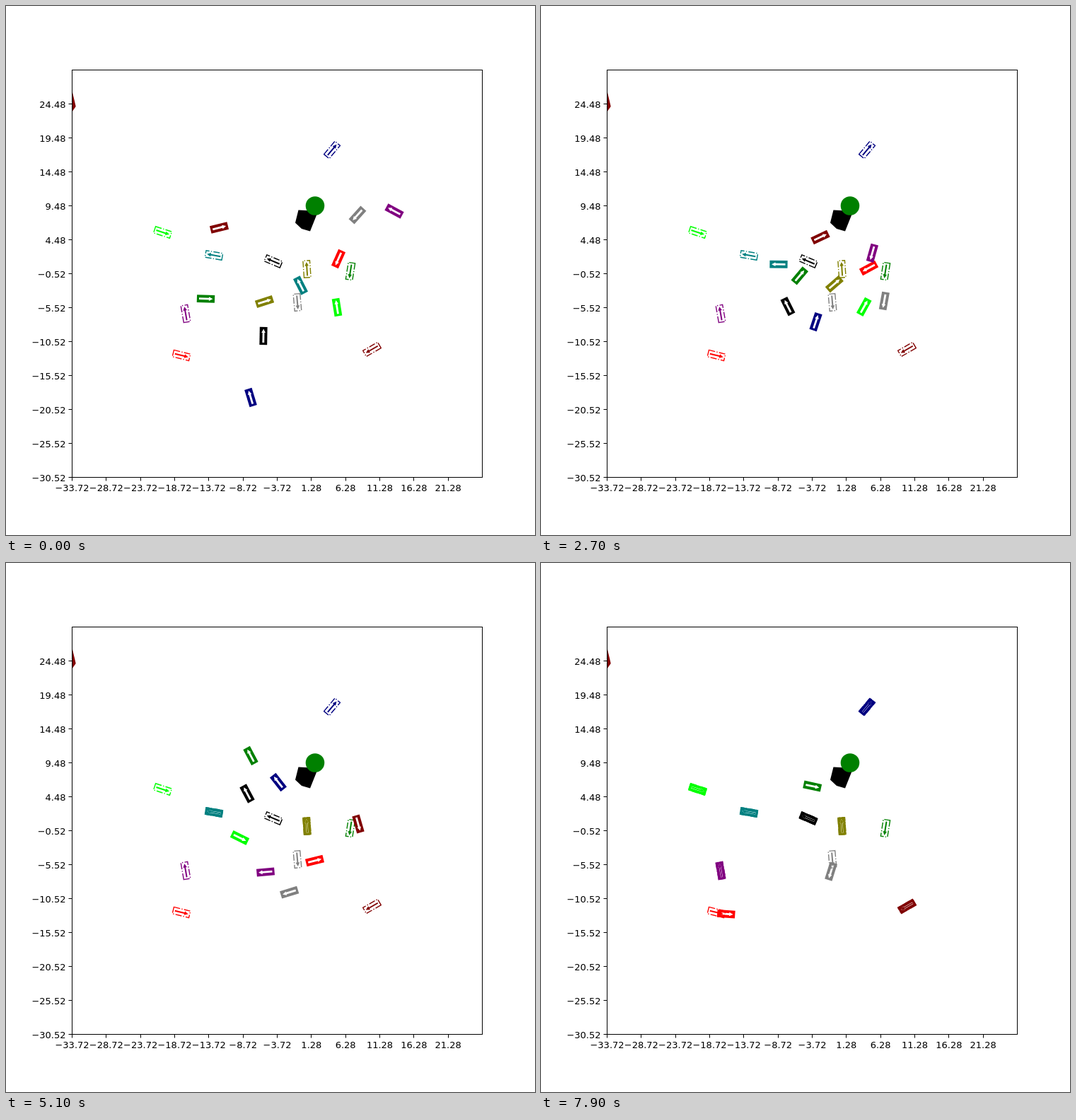
An HTML page with a canvas for the animation above (8 s loop, 748 by 748 pixels).

```html
<!DOCTYPE html>
<html>
<head>
<meta charset="utf-8">
<style>
  html, body { margin: 0; width: 100%; height: 100%; overflow: hidden; background: #fff; }
  canvas { display: block; width: 748px; height: 748px; }
</style>
</head>
<body>
<canvas id="stage" width="748" height="748"></canvas>
<script>
const ctx = document.getElementById('stage').getContext('2d');
const LOOP = 8000, STEP = 100;
const LENGTH = 24, WIDTH = 9.6;
const AXES = { left: 93.5, top: 90.5, width: 580, height: 576, ticks: 12 };

function hermite(p, m, q, n, u) {
  const c = 3 * (q - p) - 2 * m - n, d = 2 * (p - q) + m + n;
  return { value: p + u * (m + u * (c + u * d)), slope: m + u * (2 * c + 3 * u * d) };
}

const poseOf = (x, y, degrees) => ({ x, y, a: degrees * Math.PI / 180 });

// Starts at rest and leaves and meets every pose along its heading, forwards or in reverse.
class Car {
  constructor(color, x, y, degrees) {
    this.color = color;
    this.last = { step: 0, ...poseOf(x, y, degrees) };
    this.legs = [];
  }

  driveTo(step, x, y, degrees) {
    const from = this.last, to = { step, ...poseOf(x, y, degrees) };
    const turn = to.a - from.a;
    to.a = from.a + Math.atan2(Math.sin(turn), Math.cos(turn));
    const half = (to.a - from.a) / 2, mid = from.a + half;
    const dx = to.x - from.x, dy = to.y - from.y;
    const reach = Math.hypot(dx, dy) / Math.cos(half / 2) ** 2;
    const sign = dx * Math.cos(mid) + dy * Math.sin(mid) < 0 ? -1 : 1;
    const steps = to.step - from.step;
    this.legs.push({ from, to, steps, reach, sign, speed: reach / steps });
    this.last = to;
    return this;
  }

  parkAt(step, x, y, degrees) {
    this.goal = poseOf(x, y, degrees);
    return this.driveTo(step, x, y, degrees);
  }

  // Zero at both ends of the trip and wherever the car changes direction.
  speedBetween(before, after) {
    if (!before || !after || before.sign !== after.sign) return 0;
    return (before.speed * after.steps + after.speed * before.steps) / (before.steps + after.steps);
  }

  poseAt(step) {
    if (step >= this.last.step) return this.last;
    const i = this.legs.findIndex(leg => step < leg.to.step);
    const { from, to, steps, reach, sign } = this.legs[i];
    const s = (step - from.step) / steps;
    const pace = j => Math.min(2.6, this.speedBetween(this.legs[j - 1], this.legs[j]) * steps / reach);
    const u = hermite(0, pace(i), 1, pace(i + 1), s).value;
    const pull = sign * reach;
    const x = hermite(from.x, pull * Math.cos(from.a), to.x, pull * Math.cos(to.a), u);
    const y = hermite(from.y, pull * Math.sin(from.a), to.y, pull * Math.sin(to.a), u);
    const a = reach < 25 ? from.a + (to.a - from.a) * s : Math.atan2(sign * y.slope, sign * x.slope);
    return { x: x.value, y: y.value, a };
  }

  draw(step) {
    withPose(this.poseAt(step), () => {
      ctx.fillStyle = this.color;
      ctx.fillRect(-LENGTH / 2 - 0.6, -WIDTH / 2 - 0.6, LENGTH + 1.2, WIDTH + 1.2);
      drawArrow('#fff', 2.8);
    });
    withPose(this.goal, () => {
      ctx.strokeStyle = this.color;
      ctx.lineWidth = 1.4;
      ctx.setLineDash([8.9, 2.2, 1.4, 2.2]);
      ctx.strokeRect(-LENGTH / 2, WIDTH / 2, LENGTH, -WIDTH);
      drawArrow(this.color, 2);
    });
  }
}

function withPose({ x, y, a }, draw) {
  ctx.save();
  ctx.translate(x, y);
  ctx.rotate(a);
  draw();
  ctx.restore();
}

function fillPolygon(color, ...points) {
  ctx.fillStyle = color;
  ctx.beginPath();
  points.forEach(([x, y]) => ctx.lineTo(x, y));
  ctx.fill();
}

function drawArrow(color, width) {
  ctx.fillStyle = color;
  ctx.fillRect(-9.5, -width / 2, 15, width);
  fillPolygon(color, [4.5, -2.8], [10, 0], [4.5, 2.8]);
}

function drawObstacles() {
  fillPolygon('#000', [413.5, 288.5], [439, 290], [439, 296], [430, 318.5], [418, 315], [409, 306.5]);
  fillPolygon('maroon', [93.5, 120], [98.7, 142], [93.5, 149.5]);
  ctx.fillStyle = 'green';
  ctx.beginPath();
  ctx.arc(437, 282.5, 13.3, 0, 2 * Math.PI);
  ctx.fill();
}

function drawAxes() {
  const { left, top, width, height, ticks } = AXES;
  const bottom = top + height;
  const label = v => v.toFixed(2).replace('-', '\u2212');
  ctx.strokeStyle = ctx.fillStyle = '#000';
  ctx.lineWidth = 1;
  ctx.font = '13px "DejaVu Sans", sans-serif';
  ctx.strokeRect(left, top, width, height);
  ctx.beginPath();
  for (let i = 0; i < ticks; i++) {
    const x = left + i * width / ticks, y = bottom - i * height / ticks;
    const snapped = Math.floor(x) + 0.5;
    ctx.moveTo(snapped, bottom);
    ctx.lineTo(snapped, bottom + 5);
    ctx.moveTo(left, y);
    ctx.lineTo(left - 5, y);
    ctx.textAlign = 'center';
    ctx.fillText(label(-33.72 + 5 * i), x, 686);
    ctx.textAlign = 'right';
    ctx.fillText(label(-30.52 + 5 * i), left - 9, y + 5);
  }
  ctx.stroke();
}

const cars = [
  new Car('black', 364, 466.5, -89)
    .driveTo(33, 341, 402, -98).driveTo(50, 341, 326, -118).parkAt(78, 378, 361, 203),
  new Car('green', 282.5, 414, 2)
    .driveTo(33, 381, 351, -77).driveTo(50, 346, 272.5, -118).driveTo(62, 301, 260.5, 104)
    .parkAt(105, 487, 375, 99),
  new Car('red', 470, 357.5, 114)
    .driveTo(18, 454, 375.5, 155).driveTo(33, 485.5, 366.5, 205).driveTo(50, 436.5, 421, -14)
    .parkAt(85, 248, 494, 14),
  new Car('maroon', 301.5, 313.5, -14)
    .driveTo(18, 356, 336.5, 2).driveTo(33, 431.5, 307, -28).driveTo(50, 498, 369, 74)
    .parkAt(78, 517.5, 485.5, 150),
  new Car('gray', 497, 295.5, 132)
    .driveTo(33, 470, 445.5, 140).driveTo(62, 380, 477, 137).parkAt(86, 412, 419, 85),
  new Car('purple', 549, 290, 208)
    .driveTo(33, 461, 399.5, 91).driveTo(50, 367, 437, 175).parkAt(76, 254, 435, 260),
  new Car('lime', 468, 426, 261)
    .driveTo(18, 460, 404.5, 259).driveTo(33, 428, 440.5, 6).driveTo(50, 330.5, 388.5, 26)
    .driveTo(62, 266, 384.5, 36).parkAt(78, 221.5, 320, 18),
  new Car('teal', 416.5, 395, 243)
    .driveTo(18, 378.5, 358.5, 165).driveTo(33, 305.5, 357.5, 210).parkAt(50, 294, 352.5, 190),
  new Car('olive', 365.5, 418, -18)
    .driveTo(18, 400.5, 403, -31).parkAt(44, 425.5, 372, -94),
  new Car('navy', 346, 553.5, -107)
    .driveTo(33, 382.5, 413, -136).driveTo(50, 385, 310, -128).parkAt(78, 461, 203.5, -50),
];

function render(now) {
  const step = Math.max(0, Math.floor(now % LOOP / STEP) - 1);
  ctx.fillStyle = '#fff';
  ctx.fillRect(0, 0, 748, 748);
  cars.forEach(car => car.draw(step));
  drawObstacles();
  drawAxes();
  requestAnimationFrame(render);
}
render(0);
</script>
</body>
</html>
```
